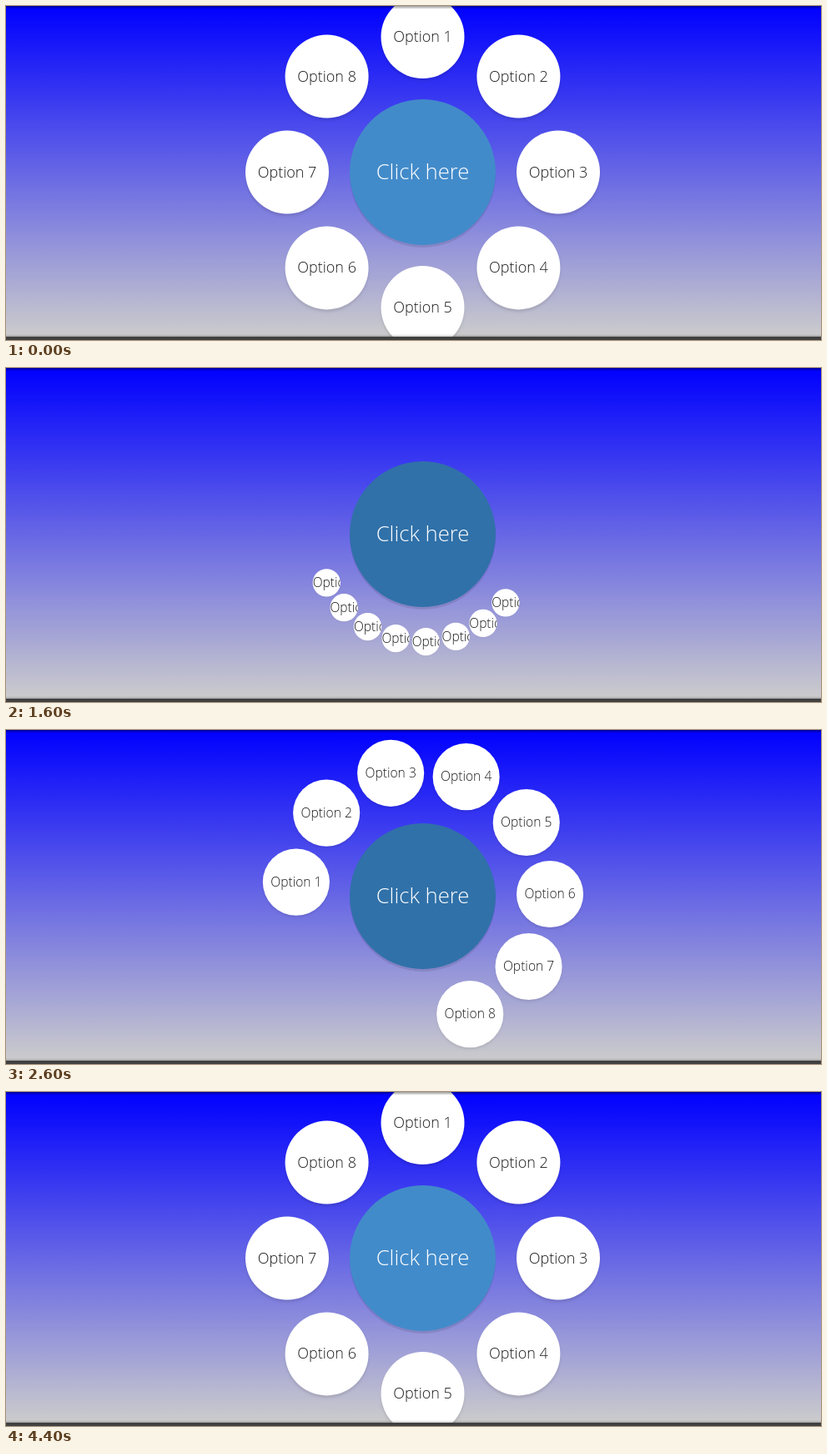
These frames come from a looping animation (977x401 px, 5.2 s). An HTML page with a canvas:

```html
<!DOCTYPE html>
<html lang="en">
<head>
<meta charset="utf-8">
<title>Circle menu</title>
<style>
  html, body { margin: 0; height: 100%; overflow: hidden; }
  canvas { display: block; }
</style>
</head>
<body>
<canvas id="stage" width="977" height="401"></canvas>
<script>
const ctx = document.getElementById('stage').getContext('2d');
const WIDTH = 977, FLOOR = 397, LOOP = 5200, STEP = 100, DURATION = 800;
const CX = 499.5, CY = 199.5, BUTTON_RADIUS = 87.5, RING = 112.5, OPTION_SIZE = 100;
const FONT = '"Open Sans", "Noto Sans", sans-serif';

// Alternating close / open start times; sizes trail the rotation slightly.
const SPIN_TOGGLES = [550, 1272, 2333, 3583];
const SIZE_TOGGLES = [550, 1284, 2353, 3590];

// CSS ease-in-out: cubic-bezier(.42, 0, .58, 1)
function easeInOut(x) {
  if (x >= 1) return 1;
  let lo = 0, hi = 1;
  for (let i = 0; i < 24; i++) {
    const s = (lo + hi) / 2, q = 1 - s;
    if (1.26 * s * q * q + 1.74 * s * s * q + s ** 3 < x) lo = s; else hi = s;
  }
  return lo * lo * (3 - 2 * lo);
}

function openness(t, toggles) {
  let value = 1;
  toggles.forEach((start, i) => {
    const end = Math.min(t, toggles[i + 1] ?? LOOP);
    if (end > start) value += (i % 2 - value) * easeInOut((end - start) / DURATION);
  });
  return value;
}

function verticalGradient(y0, y1, from, to) {
  const g = ctx.createLinearGradient(0, y0, 0, y1);
  g.addColorStop(0, from);
  g.addColorStop(1, to);
  return g;
}

function band(y0, y1, fill) {
  ctx.fillStyle = fill;
  ctx.fillRect(0, y0, WIDTH, y1 - y0);
}

function disc(x, y, radius, fill, offset, blur, alpha) {
  ctx.save();
  ctx.shadowColor = `rgba(0,0,0,${alpha})`;
  ctx.shadowOffsetY = offset;
  ctx.shadowBlur = blur;
  ctx.fillStyle = fill;
  ctx.beginPath();
  ctx.arc(x, y, radius, 0, 2 * Math.PI);
  ctx.fill();
  ctx.restore();
}

function buttonColor(t) {
  const hover = t < 300 ? 0 : t < 3200 ? 1 : t < 3300 ? 0.2 : 0;
  const mix = (a, b) => Math.round(a + (b - a) * hover);
  return `rgb(${mix(66, 48)},${mix(139, 113)},${mix(202, 169)})`;
}

function drawOption(index, spin, open) {
  const size = OPTION_SIZE * open, radius = size / 2;
  const angle = (-360 + spin * (360 + index * 45)) * Math.PI / 180;
  const x = CX + (RING + radius) * Math.sin(angle);
  const y = CY - (RING + radius) * Math.cos(angle);
  disc(x, y, radius, '#fff', 3 * open, 3 * open, 0.1 * open);

  // Labels have a minimum font size and overflow to the right.
  const text = `Option ${index + 1}`;
  const fontSize = Math.max(15.5, 6 + 12 * open);
  ctx.save();
  ctx.beginPath();
  ctx.arc(x, y, radius, 0, 2 * Math.PI);
  ctx.clip();
  ctx.font = `300 ${fontSize}px ${FONT}`;
  ctx.textAlign = 'left';
  ctx.fillStyle = '#1c1c1c';
  const textWidth = ctx.measureText(text).width;
  ctx.fillText(text, x - Math.min(textWidth, size) / 2, y + fontSize / 3);
  ctx.restore();
}

function draw(t) {
  band(0, FLOOR, verticalGradient(0, FLOOR, '#00f', '#ccc'));

  disc(CX, CY, BUTTON_RADIUS, buttonColor(t), 3, 0, 0.1);
  ctx.font = `300 25.7px ${FONT}`;
  ctx.textAlign = 'center';
  ctx.fillStyle = '#fff';
  ctx.fillText('Click here', CX, 208);

  const spin = openness(t, SPIN_TOGGLES), open = openness(t, SIZE_TOGGLES);
  if (open > 0.003) for (let i = 0; i < 8; i++) drawOption(i, spin, open);

  band(0, 4, verticalGradient(0, 4, 'rgba(0,0,0,.4)', 'rgba(0,0,0,0)'));
  band(FLOOR - 3, FLOOR, verticalGradient(FLOOR - 3, FLOOR, 'rgba(0,0,0,0)', 'rgba(0,0,0,.2)'));
  band(FLOOR, 401, '#404040');
}

function tick() {
  const t = performance.now() % LOOP;
  draw(Math.floor(t / STEP) * STEP);
  requestAnimationFrame(tick);
}
tick();
</script>
</body>
</html>
```
